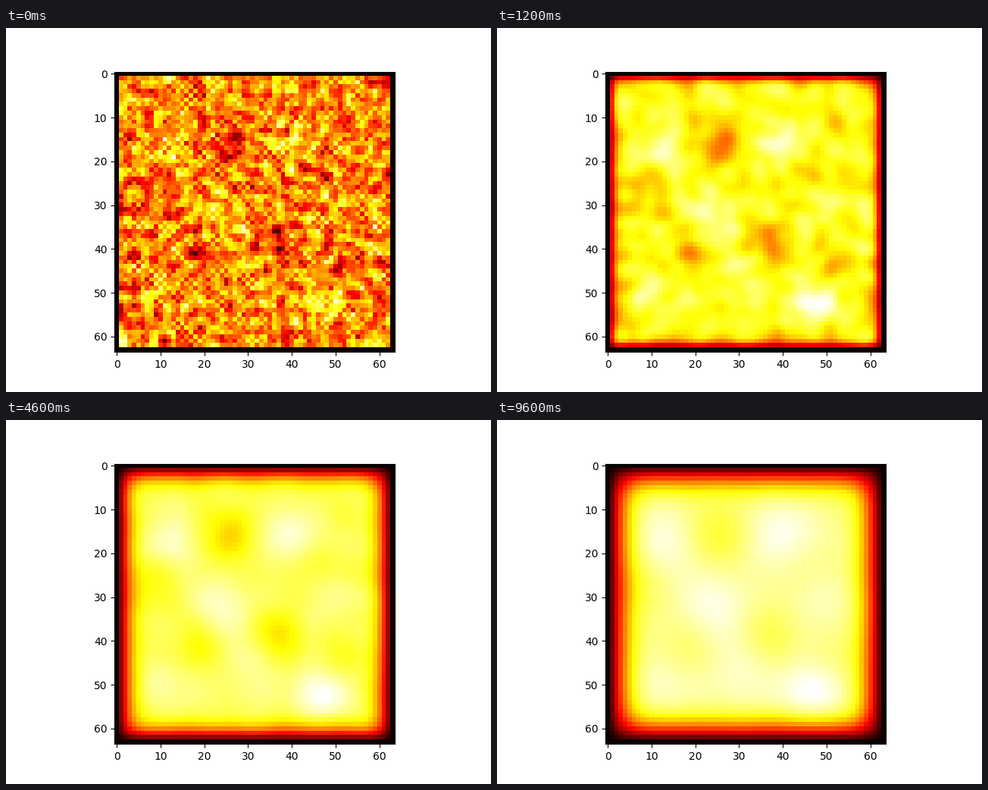
Recreate the animation shown at these times as a matplotlib script. Size 640 by 480 pixels, loop 9800 ms.

```python
import numpy as np
import matplotlib.pyplot as plt
from matplotlib.animation import FuncAnimation

SIZE = 64
FRAMES = 49
INTERVAL = 200
RATE = 0.2      # diffusion per step
RADIUS = 3.0    # of a warm or cool spot, in cells

# The few broad spots that outlast the grain: column, row, strength
SPOTS = [
    (13, 17, 0.12), (40, 16, 0.15), (24, 33, 0.17), (47, 51, 0.20),
    (30, 47, 0.08), (11, 51, 0.07), (48, 31, 0.06),
    (25.5, 16, -0.19), (37, 38, -0.15), (19, 40, -0.12),
    (8, 28, -0.08), (51, 44, -0.09), (45, 23, -0.07),
]


def diffuse(u, steps=1):
    """Explicit heat steps with the border held fixed."""
    u = u.copy()
    for _ in range(steps):
        mid = u[1:-1, 1:-1]
        around = u[:-2, 1:-1] + u[2:, 1:-1] + u[1:-1, :-2] + u[1:-1, 2:]
        u[1:-1, 1:-1] = mid + RATE * (around - 4 * mid)
    return u


def start_field():
    y, x = np.mgrid[:SIZE, :SIZE]
    noise = np.random.default_rng(7).random((SIZE, SIZE)) - 0.5
    u = 0.5 + noise - diffuse(noise, 10)    # fine grain only
    for cx, cy, strength in SPOTS:
        u += strength * np.exp(-((x - cx) ** 2 + (y - cy) ** 2) / (2 * RADIUS ** 2))
    u = diffuse(u)
    # The cold border acts from here on.
    u[[0, -1], :] = 0
    u[:, [0, -1]] = 0
    return u


states = [start_field()]
for _ in range(FRAMES - 1):
    states.append(diffuse(states[-1]))

fig, ax = plt.subplots(figsize=(6.4, 4.8), dpi=100)
image = ax.imshow(states[0], cmap="hot")


def draw(i):
    image.set_data(states[i])
    image.set_clim(0, states[i].max())
    return [image]


anim = FuncAnimation(fig, draw, frames=FRAMES, interval=INTERVAL,
                     repeat=True, repeat_delay=0)
plt.show()
```
